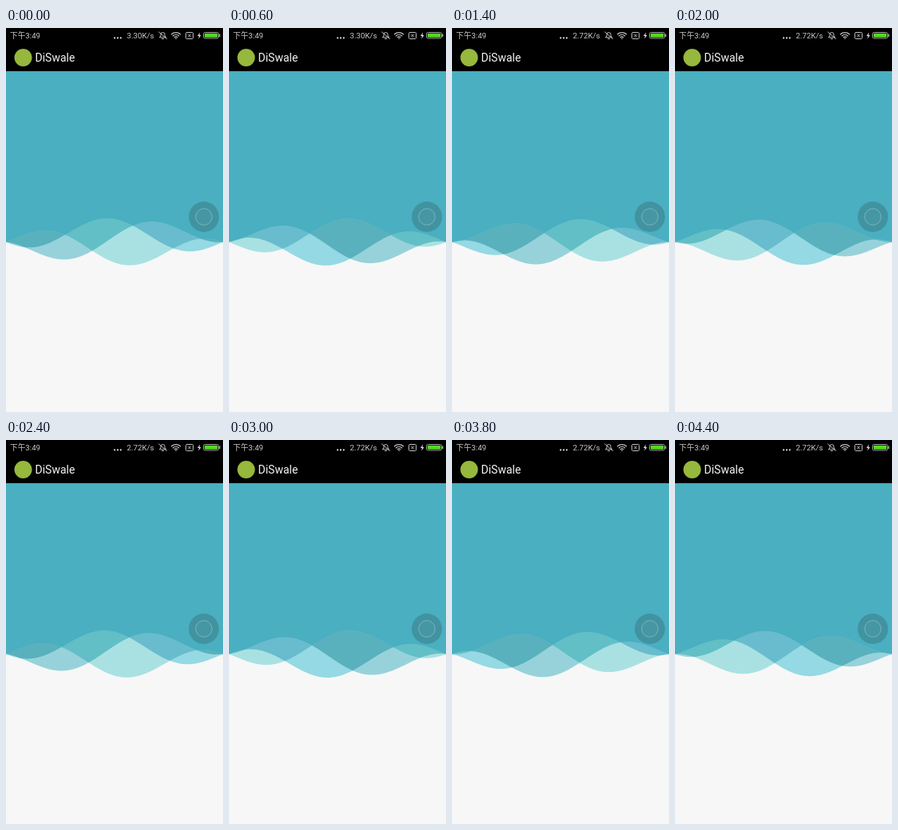
Animation of 272 by 480 pixels, one loop 4600 ms. Source, as an HTML page:

```html
<!DOCTYPE html>
<html lang="zh">
<head>
<meta charset="utf-8">
<title>Waves</title>
<style>
  html, body { margin: 0; width: 100%; height: 100%; overflow: hidden; background: #f7f7f7; }
  svg { display: block; width: 100%; height: 100%; }
  text { font-family: Roboto, "Noto Sans CJK SC", "Noto Sans CJK", sans-serif; }
  .status { font-size: 9.7px; fill: #c9c9c9; }
  .icon { fill: none; stroke: #bdbdbd; stroke-width: 1; stroke-linecap: round; }
</style>
</head>
<body>
<svg viewBox="0 0 272 480">
  <rect width="272" height="480" fill="#f7f7f7"/>
  <g id="waves"></g>

  <circle cx="248" cy="236" r="19" fill="#3d838e" fill-opacity=".62"/>
  <circle cx="248" cy="236" r="10.3" fill="#4a9ba8" fill-opacity=".5" stroke="#7ab3bc"/>

  <rect width="272" height="54"/>
  <text class="status" x="5" y="13">下午3:49</text>
  <g fill="#ddd">
    <circle cx="136.2" cy="12.4" r="1.1"/>
    <circle cx="140" cy="12.4" r="1.1"/>
    <circle cx="143.8" cy="12.4" r="1.1"/>
  </g>
  <text class="status" id="speed" x="151.5" y="13"></text>
  <g class="icon">
    <path d="M192.5 11.5L194 10V8a2.5 2.5 0 0 1 5 0v2l1.5 1.5zM195.5 13.5h2M191.5 5l10 8.5"/>
    <path d="M207.5 7.8a8 8 0 0 1 11 0M209.4 9.8a5.2 5.2 0 0 1 7.2 0M211.3 11.6a2.6 2.6 0 0 1 3.4 0" stroke-width="1.4"/>
    <path d="M213 13v.2" stroke-width="1.5"/>
    <rect x="225.5" y="5.5" width="9" height="8" rx="1"/>
    <path d="M228.3 7.8l3.4 3.4M231.7 7.8l-3.4 3.4"/>
  </g>
  <path d="M243 5.5L240 10h2l-.8 3.5L244.500 9h-2z" fill="#ddd"/>
  <rect x="247.500" y="5.500" width="19" height="7.500" rx="2" fill="none" stroke="#9a9a9a"/>
  <rect x="248.800" y="6.800" width="16.500" height="5" rx="1" fill="#55d822"/>
  <rect x="267" y="7.500" width="1.500" height="3.500" fill="#9a9a9a"/>

  <circle cx="21.5" cy="37" r="11" fill="#96b83c"/>
  <text x="36.500" y="42" font-size="14" fill="#f4f4f4">DiSwale</text>
</svg>
<script>
const WIDTH = 272, TOP = 54, BASE = 267.5, AMPLITUDE = 29.8;
const LOOP = 4600, STEP = 200;

// Crest offset of each wave, relative to the first one.
const offsets = [0, WIDTH * 3 / 8, -WIDTH * 3 / 8];

// Each colour fills the area shared by the listed waves.
const layers = [
  [[0], '#a9e1e2'], [[1], '#94d9e3'], [[2], '#97d2db'],
  [[1, 2], '#59b1bd'], [[0, 2], '#62bfc6'], [[0, 1], '#69bccd'],
  [[0, 1, 2], '#49afc1']
];

// Time in ms and distance travelled by the first crest.
const travel = [
  [0, 23], [600, 152], [1400, 336.5], [2400, 562.5],
  [3000, 699], [3800, 891], [4400, 1026]
];

function crestAt(time) {
  const next = Math.max(1, travel.findIndex(([t]) => t >= time));
  const [t0, x0] = travel[next - 1], [t1, x1] = travel[next];
  return x0 + (x1 - x0) * (time - t0) / (t1 - t0);
}

function waveY(x, crest) {
  const u = x / WIDTH;
  const envelope = 4 * u * (1 - u);
  return BASE - AMPLITUDE * envelope * Math.cos(2 * Math.PI * (x - crest) / WIDTH);
}

function areaPath(waves, crest) {
  let d = `M0 ${TOP}`;
  for (let x = 0; x <= WIDTH; x++) {
    const y = Math.min(...waves.map(i => waveY(x, crest + offsets[i])));
    d += `L${x} ${y.toFixed(2)}`;
  }
  return d + `V${TOP}Z`;
}

const group = document.getElementById('waves');
const speed = document.getElementById('speed');
const paths = layers.map(([, color]) => {
  const path = document.createElementNS(group.namespaceURI, 'path');
  path.setAttribute('fill', color);
  return group.appendChild(path);
});

function draw(time) {
  const crest = crestAt(time);
  layers.forEach(([waves], i) => paths[i].setAttribute('d', areaPath(waves, crest)));
  speed.textContent = time < 1000 ? '3.30K/s' : '2.72K/s';
}

const start = performance.now();
function tick() {
  const time = (performance.now() - start) % LOOP;
  draw(Math.floor(time / STEP) * STEP);
  requestAnimationFrame(tick);
}
tick();
</script>
</body>
</html>
```
